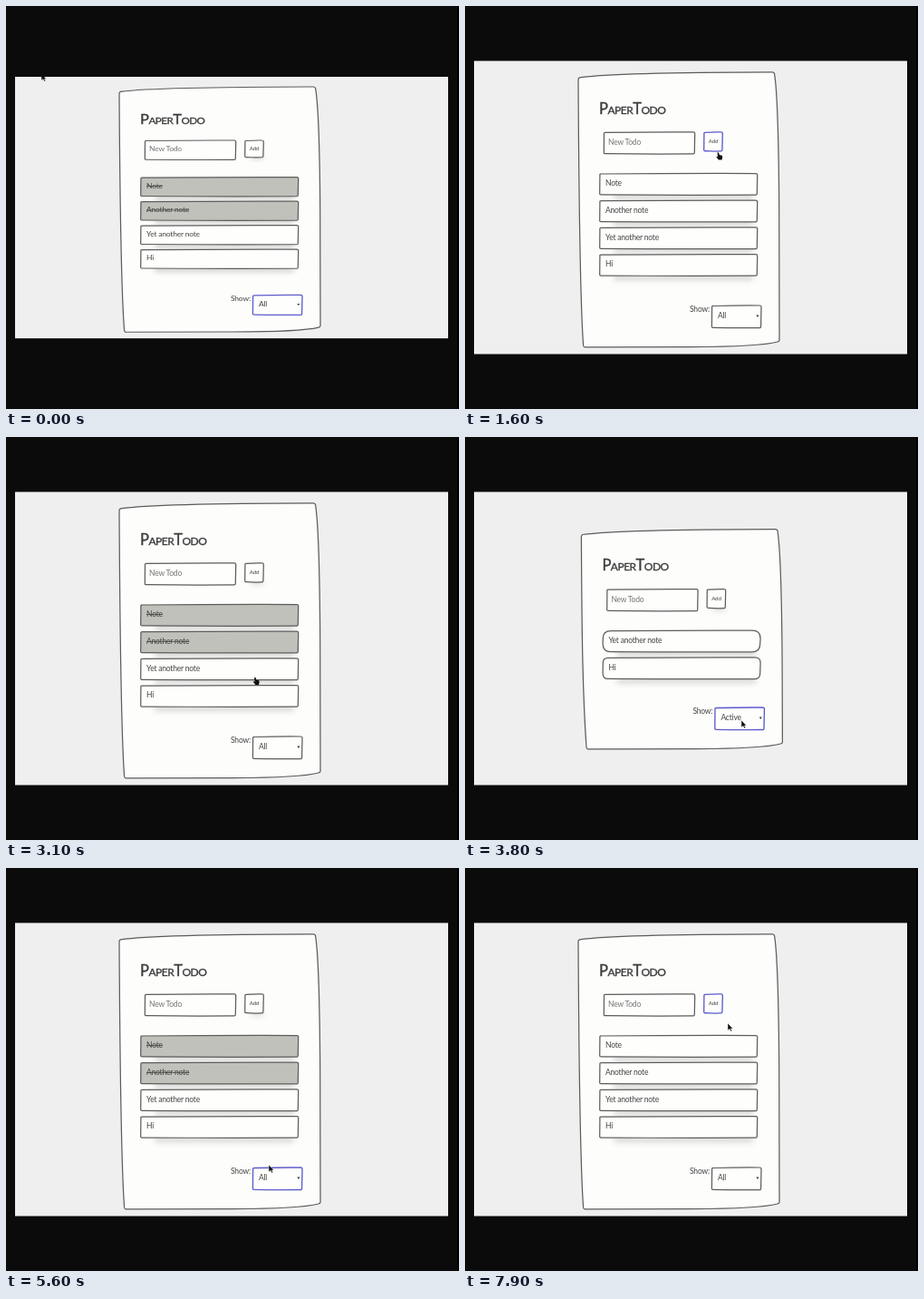
Write an HTML page that moves like this. It is 500 px wide and 444 px high and loops after 8 s.

```html
<!DOCTYPE html>
<html lang="en">
<head>
<meta charset="utf-8">
<title>PaperTodo</title>
<style>
  html, body { margin: 0; width: 100%; height: 100%; overflow: hidden; background: #0b0b0b; }
  svg { display: block; width: 100vw; height: 100vh; }
  text { font: 8.5px Lato, "Open Sans", sans-serif; letter-spacing: -.2px; fill: #444; white-space: pre; }
  .title { font-size: 16.5px; font-variant: small-caps; letter-spacing: -.5px; fill: #3c3c3c; stroke: #3c3c3c; stroke-width: .35px; }
  .small { font-size: 6.2px; }
  .hint { fill: #777; }
  .done { text-decoration: line-through; }
  .picked { fill: #fff; }
  .line { stroke: #5c5c5c; stroke-width: 1.25; }
  .focus { stroke: #5b5bcb; stroke-width: 1.35; }
  .shade { fill: #000; opacity: .13; filter: blur(3px); }
</style>
</head>
<body>
<svg viewBox="0 0 500 444">
  <defs><clipPath id="screen"><rect x="10" y="60.4" width="478" height="323.2"/></clipPath></defs>
  <rect width="500" height="444" fill="#0b0b0b"/>
  <rect x="498" width="2" height="444" fill="#000"/>
  <g id="bands"><rect width="500" height="22"/><rect y="420" width="500" height="24"/></g>
  <g id="view"><g clip-path="url(#screen)">
    <rect x="9" y="60" width="480" height="324" fill="#efefef"/>
    <g id="app"></g>
    <g id="pointer"></g>
  </g></g>
</svg>
<script>
const LOOP = 8000, SESSION = 6000, STEP = 100;
const OPTIONS = ['All', 'Active', 'Completed'];
const NOTES = ['Note', 'Another note', 'Yet another note'];
// Panel top and bottom for each number of rows
const PANEL = { 2: [101, 344], 3: [86, 358.5], 4: [72.3, 376] };

// time, x, y, shape
const PATH = [
  [0, 39, 57, 'arrow'], [100, 38, 44, 'arrow'], [200, 322, 362, 'arrow'],
  [400, 289, 305, 'arrow'], [500, 289, 305, 'arrow'], [600, 250, 245, 'arrow'],
  [700, 190, 167, 'beam'], [800, 181, 161, 'beam'], [900, 181, 161, 'beam'],
  [1000, 216, 169, 'beam'], [1100, 262.5, 178.5, 'beam'], [1200, 274, 165, 'hand'],
  [1400, 275, 162, 'hand'], [1800, 282, 161, 'arrow'], [1900, 290, 171, 'arrow'],
  [2000, 284, 185, 'hand'], [2200, 265, 198, 'hand'], [2600, 265, 198, 'hand'],
  [2800, 262, 226, 'hand'], [3000, 262, 226, 'hand'], [3300, 298, 343, 'arrow'],
  [3400, 299, 341, 'arrow'], [3600, 306, 309, 'arrow'], [3800, 305, 312, 'arrow'],
  [4300, 303, 313, 'arrow'], [4600, 304, 360, 'arrow'], [4800, 304, 359, 'arrow'],
  [5100, 300, 316, 'arrow'], [5200, 299, 316, 'arrow'], [5400, 291, 329, 'arrow'],
  [5600, 290, 327, 'arrow'], [5700, 235, 265, 'arrow'], [5900, 40, 72, 'arrow']
];

const SHAPES = {
  arrow: '<path d="M0 0V8L2 6.3 3.3 9 4.6 8.4 3.4 5.9H5.6Z" fill="#111" stroke="#fff" stroke-width=".4"/>',
  beam: '<path d="M-1.5-3.8H1.5M0-3.8V3.8M-1.5 3.8H1.5" fill="none" stroke="#444" stroke-width=".8"/>',
  hand: '<path d="M0 0Q1 -.8 1.7 .4L2.3 2.6 5 3.2Q6 3.6 5.6 5.5L5 8H1.4L-1.2 4.8Q-1 4 .6 4.4Z" fill="#111"/>'
};

const $ = id => document.getElementById(id);
const within = (u, a, b) => u >= a && u < b;
const text = (x, y, s, cls = '') => `<text x="${x}" y="${y}" class="${cls}">${s}</text>`;
const shade = (x, y, w, h) => `<rect class="shade" x="${x}" y="${y}" width="${w}" height="${h}"/>`;

function box(x, y, w, h, { fill = '#fefefd', focus = false, r = 1.6 } = {}) {
  // Slightly uneven sides give the hand-drawn look
  const right = x + w, low = y + h;
  return `<path class="${focus ? 'focus' : 'line'}" fill="${fill}" d="M${x + r} ${y + .5}
    Q${x + w / 2} ${y - .2} ${right - r} ${y}Q${right} ${y} ${right} ${y + r}
    L${right - .4} ${low - r}Q${right - .4} ${low} ${right - r} ${low}
    Q${x + w / 2} ${low + .4} ${x + r} ${low - .2}Q${x} ${low} ${x} ${low - r}
    L${x + .2} ${y + r}Q${x} ${y + .4} ${x + r} ${y + .5}Z"/>`;
}

function paper(top, bottom) {
  return `<path class="line" fill="#fdfefc" d="M126.5 ${top + 6.5}Q165 ${top + .8} 339 ${top + .5}
    Q341 ${top + .5} 341.5 ${top + 2}C344.5 ${top + 20} 346.3 ${top + 85} 346.7 ${top + 150}
    L347 ${bottom - 8}Q347 ${bottom - 6.5} 345 ${bottom - 6}Q325 ${bottom - .6} 250 ${bottom - .5}
    L132.5 ${bottom - .2}Q131 ${bottom} 130.6 ${bottom - 2}
    C126.5 ${bottom - 60} 125.6 ${top + 120} 125 ${top + 9}Q125 ${top + 7} 126.5 ${top + 6.5}Z"/>`;
}

function pointerAt(u) {
  const i = PATH.findLastIndex(k => k[0] <= u);
  const [t, x, y, shape] = PATH[i];
  const next = PATH[i + 1];
  if (!next) return { x, y, shape };
  const p = (u - t) / (next[0] - t);
  return { x: x + (next[1] - x) * p, y: y + (next[2] - y) * p, shape };
}

function stateAt(u) {
  const fresh = u >= 200;
  const filter = within(u, 3700, 4800) ? 1 : within(u, 4800, 5500) ? 2 : 0;
  const names = within(u, 200, 1400) ? NOTES : [...NOTES, 'Hi'];
  const doneCount = !fresh || u >= 3000 ? 2 : u >= 2600 ? 1 : 0;
  const rows = names.map((name, i) => ({ name, done: i < doneCount }))
    .filter(row => !filter || row.done === (filter === 2));
  const focus = !fresh || u >= 3400 ? 'select'
    : within(u, 700, 1300) ? 'input'
    : within(u, 1300, 2600) ? 'add' : '';
  return {
    rows, filter, focus,
    typed: within(u, 800, 1400) ? 'Hi' : '',
    caret: within(u, 700, 1000),
    open: within(u, 3400, 3700) || within(u, 4300, 4800) || within(u, 5200, 5500)
  };
}

function menu(y, current, pointer) {
  const hover = Math.floor((pointer.y - y) / 15);
  const active = OPTIONS[hover] ? hover : current;
  return `<rect x="272" y="${y}" width="58" height="45" fill="#fff" stroke="#888" stroke-width=".7"/>
    <rect x="272.4" y="${y + active * 15}" width="57.2" height="15" fill="#3b78d0"/>` +
    OPTIONS.map((s, i) => text(279, y + i * 15 + 10.5, s, i === active ? 'picked' : '')).join('');
}

function drawApp(s, pointer) {
  const [top, bottom] = PANEL[s.rows.length];
  const tall = s.rows.length === 4;
  const selectY = bottom - 46;
  let out = paper(top, bottom) + text(148, top + 46.3, 'PaperTodo', 'title');

  const inputY = top + 66.6;
  out += box(153.3, inputY, 100.4, 24, { focus: s.focus === 'input' });
  out += text(158, top + 80.6, s.typed || 'New Todo', s.typed ? '' : 'hint');
  if (s.caret) {
    const x = s.typed ? 166 : 157.5;
    out += `<path d="M${x} ${top + 72}v10" stroke="#333" stroke-width=".8"/>`;
  }
  if (s.focus !== 'add') out += shade(270, inputY + 18, 14, 6);
  out += box(263.7, inputY, 20.6, 21, { focus: s.focus === 'add' });
  out += text(268.8, top + 78.8, 'Add', 'small');

  s.rows.forEach((row, i) => {
    const y = top + 112.2 + i * 29.7;
    const r = s.filter === 1 ? [9, 6][i] : 1.6;
    out += shade(164, y + 20, 154, 9);
    out += box(148.7, y, 174, 23.6, { fill: row.done ? '#c0c1ba' : '#fefefd', r });
    out += text(155, y + 13.8, row.name, row.done ? 'done' : '');
  });

  out += text(248, bottom - 39, 'Show:');
  out += box(272.4, selectY, 54.6, 24.5, { focus: s.focus === 'select' });
  out += text(279, bottom - 32, OPTIONS[s.filter]);
  out += `<path d="M321.4 ${bottom - 35.4}h3l-1.5 2.4z" fill="#333"/>`;
  if (s.open) out += menu(tall ? selectY - 45 : selectY + 25, s.filter, pointer);
  return `<g transform="translate(${tall ? 0 : 3.4})">${out}</g>`;
}

function viewTransform(t) {
  if (t < 200) return 'translate(0 24.1) scale(1 .892)';
  if (t < 1400) return 'translate(0 21.6) scale(1.004 .898)';
  return '';
}

function draw(t) {
  const u = t % SESSION;
  const pointer = pointerAt(u);
  $('view').setAttribute('transform', viewTransform(t));
  $('bands').style.display = within(t, 200, 1400) ? '' : 'none';
  $('app').innerHTML = drawApp(stateAt(u), pointer);
  $('pointer').innerHTML = SHAPES[pointer.shape];
  $('pointer').setAttribute('transform', `translate(${pointer.x} ${pointer.y})`);
}

const start = performance.now();
let shown = -1;
function tick() {
  const elapsed = Math.max(0, performance.now() - start) % LOOP;
  const t = Math.floor(elapsed / STEP) * STEP;
  if (t !== shown) draw(shown = t);
  requestAnimationFrame(tick);
}
tick();
</script>
</body>
</html>
```
